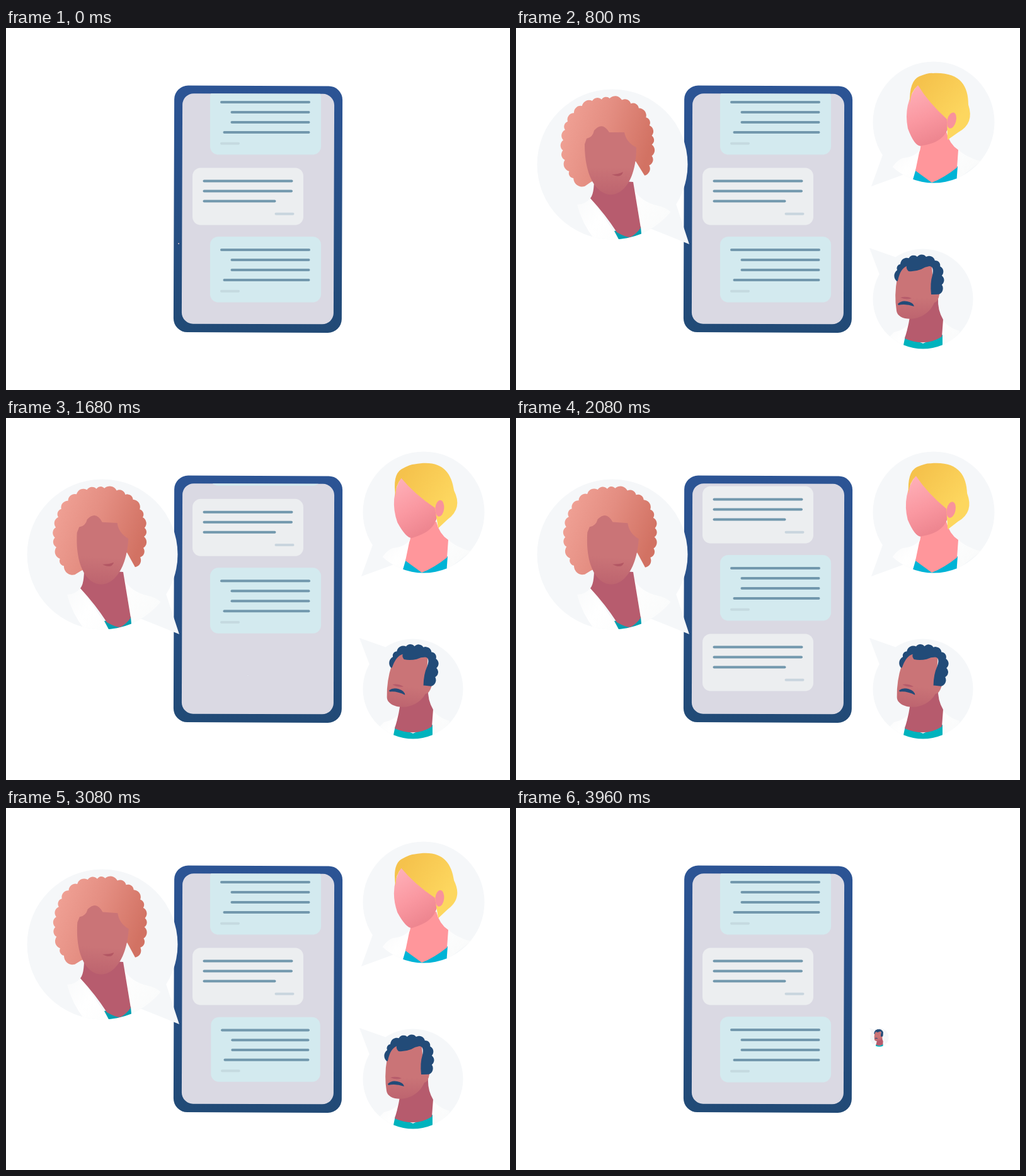
An HTML page that plays this animation: 800x576 px, repeating every 4000 ms.

```html
<!DOCTYPE html>
<html lang="en">
<head>
<meta charset="utf-8">
<title>Chat</title>
<style>
html, body { margin: 0; width: 100%; height: 100%; overflow: hidden; background: #fff; }
svg { display: block; width: 100vw; height: 100vh; }
</style>
</head>
<body>
<svg viewBox="0 0 800 576">
  <defs>
    <linearGradient id="frame" x2="0" y2="1"><stop stop-color="#2c5495"/><stop offset="1" stop-color="#214a76"/></linearGradient>
    <linearGradient id="curls" y1=".1" x2="1" y2=".4"><stop stop-color="#f2a498"/><stop offset=".5" stop-color="#e48e82"/><stop offset="1" stop-color="#d27263"/></linearGradient>
    <linearGradient id="tan" x2="0" y2="1"><stop offset=".6" stop-color="#ca7477"/><stop offset="1" stop-color="#bd646f"/></linearGradient>
    <linearGradient id="blond" x2="1" y2="1"><stop offset=".15" stop-color="#f5c24c"/><stop offset=".75" stop-color="#fdd75f"/></linearGradient>
    <linearGradient id="pink" x2=".3" y2="1"><stop stop-color="#ffb3bb"/><stop offset=".6" stop-color="#fa98a1"/><stop offset="1" stop-color="#ee8690"/></linearGradient>
    <linearGradient id="coat" x2="1" y2=".4"><stop stop-color="#f8f9fa"/><stop offset=".4" stop-color="#fff"/><stop offset="1" stop-color="#fafbfb"/></linearGradient>
    <clipPath id="screen"><rect x="279.500" y="104.500" width="241" height="366.500" rx="18" transform="rotate(.2 400 288)"/></clipPath>
  </defs>

  <rect x="266.500" y="92" width="267" height="392.500" rx="22" fill="url(#frame)" transform="rotate(.2 400 288)"/>
  <g clip-path="url(#screen)">
    <rect x="270" y="100" width="260" height="380" fill="#dad9e3"/>
    <g id="list"></g>
  </g>

  <g id="curly">
    <g class="bust">
      <path fill="url(#coat)" d="M97 281Q110 281 119 270L164 337H125Q104 310 97 281ZM187 256Q198 277 226 283Q249 288 256 310L197 337Z"/>
      <path fill="#009fb0" d="M156 323L165 340H200L198 316Z"/>
      <path fill="#b75c6e" d="M124 240Q124 264 118 271Q142 297 160 325Q174 333 181 333Q190 329 198 318L186 245Z"/>
    </g>
    <g class="head">
      <path class="hair" fill="url(#curls)"/>
      <path fill="url(#tan)" d="M109 185C109 292 191 290 191 190Q175 182 172 166H148Q137 148 124 163Q122 174 112 176Z"/>
      <path fill="#b35764" d="M152 233Q162 233 170 229Q167 240 152 233Z"/>
    </g>
  </g>

  <g id="fair">
    <g class="bust">
      <path fill="url(#coat)" d="M642 191Q636 205 614 207Q598 213 590 238L632 244ZM701 193Q715 206 738 212L699 242Z"/>
      <path fill="#00b4d6" d="M635 224L628 248H699L701 220L660 243Z"/>
      <path fill="#ff969b" d="M643 174Q643 192 640 198L634 227L660 246Q680 238 700 222L702 194Q688 185 683 165Z"/>
    </g>
    <g class="head">
      <path fill="url(#pink)" d="M638 90Q614 120 622 160Q634 192 645 187C680 182 684 165 692 145Z"/>
      <path fill="url(#blond)" d="M625 120Q624 84 640 77Q655 71 662 72C705 70 718 92 718 122Q728 152 702 166L685 178L684 145Q655 119 638 91Q626 102 625 120Z"/>
      <ellipse cx="691.500" cy="147" rx="7" ry="13" transform="rotate(14 691 147)" fill="#f9929c"/>
    </g>
  </g>

  <g id="dark">
    <g class="bust">
      <path fill="url(#coat)" d="M623 472Q614 481 600 484L588 496L616 512ZM677 464Q686 477 704 482L700 498L676 506Z"/>
      <path fill="#00b3bd" d="M618 490L613 514H677V488L646 502Z"/>
      <path fill="#b65b6d" d="M626 450Q625 468 617 494Q650 508 676 491L678 464Q669 449 670 430Z"/>
    </g>
    <g class="head">
      <path fill="url(#tan)" d="M605 398L616 378H660L663 420Q673 412 672 424Q670 436 664 437C650 470 606 468 604 450Q600 425 605 398Z"/>
      <path class="hair" fill="#224b78"/>
      <path fill="#b65c6b" d="M610 429Q619 426 628 430Q620 433 610 429Z"/>
      <path fill="#224b78" d="M606 439Q612 433 621 435Q631 437 632 443Q618 438 607 441Z"/>
    </g>
  </g>
</svg>
<script>
const LOOP = 4000;
const $ = id => document.getElementById(id);
const span = (t, start, length) => Math.min(1, Math.max(0, (t - start) / length));
const smooth = (t, start, length) => {
  const p = span(t, start, length);
  return p * p * (3 - 2 * p);
};
const polar = (x, y, r, deg) => {
  const a = deg * Math.PI / 180;
  return [x + r * Math.cos(a), y + r * Math.sin(a)];
};
const noise = i => { const v = Math.sin(i * 12.9898) * 43758.5453; return v - Math.floor(v) - 0.5; };

// A ring of slightly uneven curls, wider on the diagonals and low down.
function curls(x, y, r, bulge, sag, from, to, count) {
  const jitter = r / 28;
  let d = "", last;
  for (let i = 0; i <= count; i++) {
    const deg = from + (to - from) * (i + 0.3 * noise(i)) / count;
    const a = deg * Math.PI / 180;
    const reach = r + bulge * Math.abs(Math.sin(2 * a)) + sag * Math.max(0, Math.sin(a)) + jitter * noise(i + 40);
    const p = polar(x, y, reach, deg);
    const arc = last ? Math.hypot(p[0] - last[0], p[1] - last[1]) * 0.62 : 0;
    d += last ? `A${arc} ${arc} 0 0 1 ${p}` : `M${p}`;
    last = p;
  }
  return d;
}

function setHair(id, d) {
  document.querySelector(`#${id} .hair`).setAttribute("d", d);
}
setHair("curly", curls(146, 183, 70, 3, 6, 120, 401, 22) + "L190 212L119 245Z");
setHair("dark", curls(640.5, 400, 35, 4, 0, 178, 395, 10) +
  "L662 424H659Q657 406 661 393Q664 379 656 379Q649 380 643 384Q633 388 623 387Q619 383 620 379Q610 383 606 402Z");

const people = [
  { id: "curly", x: 153, y: 217, r: 119.5, tip: [275, 344], neck: [157, 250], start: 0, end: 3280 },
  { id: "fair", x: 663, y: 150, r: 96.5, tip: [564, 252], neck: [666, 168], start: 160, end: 3440 },
  { id: "dark", x: 646, y: 431, r: 79.5, tip: [561, 350], neck: [650, 452], start: 320, end: 3600 }
];

for (const p of people) {
  const { id, x, y, r, tip } = p;
  const aim = Math.atan2(tip[1] - y, tip[0] - x) * 180 / Math.PI;
  const tail = [polar(x, y, r, aim - 14), tip, polar(x, y, r, aim + 13), [x, y]].join(" ");
  p.el = $(id);
  p.head = p.el.querySelector(".head");
  p.el.querySelector(".bust").setAttribute("clip-path", `url(#${id}Clip)`);
  p.el.insertAdjacentHTML("afterbegin",
    `<clipPath id="${id}Clip"><circle cx="${x}" cy="${y}" r="${r}"/></clipPath>
     <g fill="#f5f7f9"><circle cx="${x}" cy="${y}" r="${r}"/><polygon points="${tail}"/></g>`);
}

const KINDS = {
  sent: { x: 324, h: 104.5, fill: "#d3eaef", foot: "#c5dae0", footX: 342,
    rows: [[342, 481], [358.5, 480.5], [358.5, 480.5], [346.5, 480.5]] },
  got: { x: 296, h: 91, fill: "#eceef0", foot: "#c9d5de", footX: 428.5,
    rows: [[314.5, 453.5], [314.5, 453], [314.5, 426.5]] }
};

function makeCard(kind, y, pop) {
  const k = KINDS[kind];
  const g = document.createElementNS("http://www.w3.org/2000/svg", "g");
  const line = (a, b, ly, color) => `<path d="M${a} ${ly}H${b}" stroke="${color}"/>`;
  g.innerHTML = `<rect x="${k.x}" y="${y}" width="176" height="${k.h}" rx="13" fill="${k.fill}"/>
    <g stroke-width="4" stroke-linecap="round">
    ${k.rows.map(([a, b], i) => line(a, b, y + 21 + 16 * i, "#7298ad")).join("")}
    ${line(k.footX, k.footX + 27, y + k.h - 17.8, k.foot)}</g>`;
  $("list").append(g);
  return { g, pop, x: k.x + 88, y: y + k.h / 2 };
}

const cards = [
  makeCard("sent", 97), makeCard("got", 222.5), makeCard("sent", 332),
  makeCard("got", 457.5, 1670), makeCard("sent", 567, 2900)
];

function scaleAt(el, x, y, s) {
  el.setAttribute("visibility", s > 0.005 ? "visible" : "hidden");
  el.setAttribute("transform", `translate(${x} ${y}) scale(${s}) translate(${-x} ${-y})`);
}

// Degrees each head is turned at time t.
const turns = {
  curly: t => 3.7 * (1 - smooth(t, 400, 400) + smooth(t, 1360, 420)),
  fair: t => -8 * (smooth(t, 800, 560) - smooth(t, 1720, 560) + smooth(t, 2280, 560) - smooth(t, 3080, 560)),
  dark: t => 7.5 * (smooth(t, 860, 480) - smooth(t, 2580, 480))
};

function draw(t) {
  const scroll = 114 * smooth(t, 1320, 494) + 121 * smooth(t, 2560, 494);
  $("list").setAttribute("transform", `translate(0 ${-scroll})`);
  for (const c of cards) scaleAt(c.g, c.x, c.y, c.pop ? smooth(t, c.pop, 195) : 1);

  // Bubbles grow from the tail tip and later shrink back into it.
  for (const p of people) {
    const grow = 1 - (1 - span(t, p.start, 400)) ** 3;
    const shrink = 1 - span(t, p.end, 400) ** 2;
    scaleAt(p.el, ...p.tip, grow * shrink);
    p.head.setAttribute("transform", `rotate(${turns[p.id](t)} ${p.neck})`);
  }
}

const began = performance.now();
function tick() {
  draw((performance.now() - began) % LOOP);
  requestAnimationFrame(tick);
}
draw(0);
requestAnimationFrame(tick);
</script>
</body>
</html>
```
